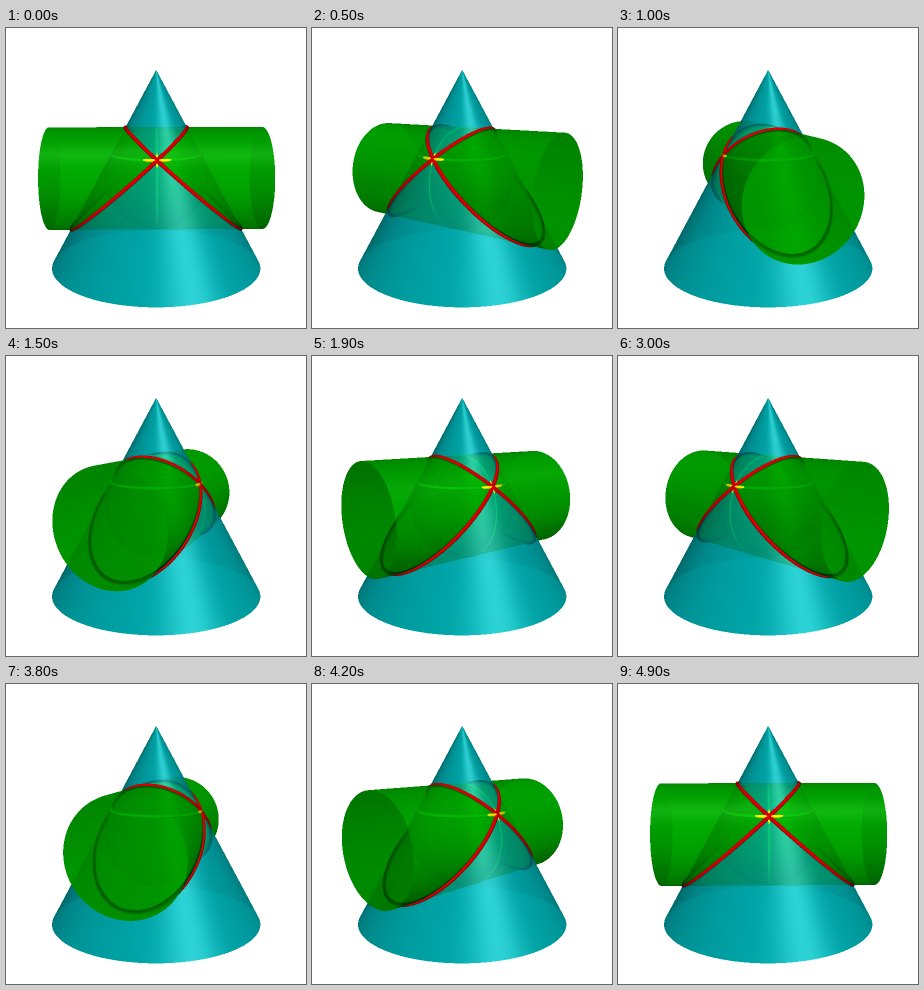
Recreate the animation shown at these times as an HTML page with a canvas. Size 300x300 px, loop 5 s.

```html
<!DOCTYPE html>
<html>
<head>
<meta charset="utf-8">
<title>Cone and cylinder around a common sphere</title>
<style>
html, body { margin: 0; width: 100%; height: 100%; overflow: hidden; background: #fff; }
canvas { display: block; width: 300px; height: 300px; }
</style>
</head>
<body>
<canvas id="view" width="600" height="600"></canvas>
<script>
const SIZE = 600, SCALE = 2;
const ctx = document.getElementById('view').getContext('2d');
const image = ctx.createImageData(SIZE, SIZE);
const pixels = image.data.fill(255);
const { sin, cos, sqrt, abs, max, min, floor, ceil, PI } = Math;

// Scene: the cone (upright) and the cylinder (level) both touch one sphere at the origin.
const R = 50.8, APEX = 105.6, BASE = -86, HALF = 105.2;
const SIN_A = R / APEX, COS_A = sqrt(1 - SIN_A * SIN_A), TAN_A = SIN_A / COS_A;
const BASE_R = (APEX - BASE) * TAN_A;

// Camera
const DIST = 450, TILT = 10.7 * PI / 180, CX = 150.2, CY = 150.3;
const SE = sin(TILT), CE = cos(TILT);
const eyeY = DIST * CE, eyeZ = DIST * SE;

// Directions are given as right, up, back and turned into the scene.
const turn = (x, up, back) => [x, back * CE - up * SE, back * SE + up * CE];
const FILL = turn(-0.1, 0.15, 0.98), KEY = turn(0.42, 0.72, 0.55), SHINE = turn(0.24, 0.41, 0.88);
const dot3 = (v, x, y, z) => v[0] * x + v[1] * y + v[2] * z;

// Tinted glass: each layer filters whatever lies behind it.
const FILTER = 0.4;
const GREEN = [0, 0.78, 0], TEAL = [0, 0.77, 0.78], CORE = [0.3, 0.72, 0.66];
const RED = [0.86, 0, 0], YELLOW = [1, 0.95, 0];

const depth = new Float32Array(SIZE * SIZE);
const tube = new Float32Array(SIZE * SIZE * 3);

const hits = Array.from({ length: 12 }, () => ({ s: 0, shade: 0, gloss: 0, color: GREEN }));
let count = 0;

// Normals point outwards; only outer faces are glossy.
function addHit(s, color, nx, ny, nz, dx, dy, dz) {
  const inside = nx * dx + ny * dy + nz * dz > 0;
  const unit = (inside ? -1 : 1) / sqrt(nx * nx + ny * ny + nz * nz);
  nx *= unit; ny *= unit; nz *= unit;
  let i = count++;
  const hit = hits[i];
  hit.s = s;
  hit.color = color;
  hit.shade = 0.4 + 0.35 * max(0, dot3(FILL, nx, ny, nz)) + 0.3 * max(0, dot3(KEY, nx, ny, nz));
  hit.gloss = inside || color === CORE ? 0 : 0.22 * max(0, dot3(SHINE, nx, ny, nz)) ** 50;
  for (; i > 0 && hits[i - 1].s > s; i--) hits[i] = hits[i - 1];
  hits[i] = hit;
}

// Calls visit with both roots of a*s^2 + 2*b*s + c = 0.
function roots(a, b, c, visit) {
  const d = b * b - a * c;
  if (d <= 0) return;
  const q = sqrt(d);
  visit((-b - q) / a);
  visit((-b + q) / a);
}

function splat(x, y, z, radius, color) {
  const s = 1 - (y * CE + z * SE) / DIST;
  const px = (CX + x / s) * SCALE;
  const py = (CY - (z * CE - y * SE) / s) * SCALE;
  const pr = radius / s * SCALE;
  for (let j = ceil(py - pr - 0.5); j + 0.5 < py + pr; j++) {
    for (let i = ceil(px - pr - 0.5); i + 0.5 < px + pr; i++) {
      const u = (i + 0.5 - px) / pr, v = (j + 0.5 - py) / pr, rest = 1 - u * u - v * v;
      if (rest <= 0) continue;
      const n = sqrt(rest), front = s - n * radius / DIST, k = j * SIZE + i;
      if (front >= depth[k]) continue;
      depth[k] = front;
      const shade = min(1, 0.35 + 0.7 * max(0, n - 0.3 * v));
      for (let c = 0; c < 3; c++) tube[k * 3 + c] = color[c] * shade;
    }
  }
}

function drawTubes(ca, sa) {
  depth.fill(Infinity);
  tube.fill(1);
  const dot = (u, w, z, radius, color) =>
    splat(u * ca - w * sa, u * sa + w * ca, z, radius, color);
  for (let i = 0; i < 900; i++) {
    const p = i * PI / 450, w = R * cos(p), z = R * sin(p);
    const u = (z - R * SIN_A) / COS_A;
    dot(u, w, z, 1.9, RED);
    dot(-u, w, z, 1.9, RED);
    dot(0, w * 0.98, z * 0.98, 1.5, YELLOW);
    dot(z * COS_A, w * COS_A, R * SIN_A, 1.6, YELLOW);
  }
}

function trace(dx, dy, dz, ca, sa) {
  count = 0;

  const du = dx * ca + dy * sa, dw = dy * ca - dx * sa;
  const eu = eyeY * sa, ew = eyeY * ca;
  roots(dw * dw + dz * dz, ew * dw + eyeZ * dz, ew * ew + eyeZ * eyeZ - R * R, s => {
    if (abs(eu + s * du) > HALF) return;
    const w = ew + s * dw, z = eyeZ + s * dz;
    addHit(s, GREEN, -w * sa, w * ca, z, dx, dy, dz);
  });
  for (let side = -1; side < 2; side += 2) {
    const s = (side * HALF - eu) / du;
    const w = ew + s * dw, z = eyeZ + s * dz;
    if (w * w + z * z < R * R) addHit(s, GREEN, side * ca, side * sa, 0, dx, dy, dz);
  }

  const tt = TAN_A * TAN_A, h = eyeZ - APEX;
  roots(dx * dx + dy * dy - tt * dz * dz, eyeY * dy - tt * h * dz,
    eyeY * eyeY - tt * h * h, s => {
      const z = eyeZ + s * dz;
      if (z < BASE || z > APEX) return;
      addHit(s, TEAL, s * dx, eyeY + s * dy, tt * (APEX - z), dx, dy, dz);
    });
  const sb = (BASE - eyeZ) / dz, bx = sb * dx, by = eyeY + sb * dy;
  if (bx * bx + by * by < BASE_R * BASE_R) addHit(sb, TEAL, 0, 0, -1, dx, dy, dz);

  roots(dx * dx + dy * dy + dz * dz, eyeY * dy + eyeZ * dz, DIST * DIST - R * R, s =>
    addHit(s, CORE, s * dx, eyeY + s * dy, eyeZ + s * dz, dx, dy, dz));
}

function render(angle) {
  const ca = cos(angle), sa = sin(angle);
  drawTubes(ca, sa);
  for (let j = 76; j < 566; j++) {
    const up = CY - (j + 0.5) / SCALE;
    const dy = -DIST * CE - up * SE, dz = -DIST * SE + up * CE;
    for (let i = 50; i < 550; i++) {
      trace((i + 0.5) / SCALE - CX, dy, dz, ca, sa);
      const k = j * SIZE + i;
      for (let c = 0; c < 3; c++) {
        let value = tube[k * 3 + c];
        for (let n = count - 1; n >= 0; n--) {
          const hit = hits[n];
          if (hit.s < depth[k])
            value = hit.color[c] * ((1 - FILTER) * hit.shade + FILTER * value) + hit.gloss;
        }
        pixels[k * 4 + c] = value * 255;
      }
    }
  }
  ctx.putImageData(image, 0, 0);
}

let shown = -1;
function tick() {
  const step = min(48, floor(performance.now() % 5000 / 100)) % 48;
  if (step !== shown) {
    shown = step;
    render((step * 7.5 - 1) * PI / 180);
  }
  requestAnimationFrame(tick);
}
tick();
</script>
</body>
</html>
```
